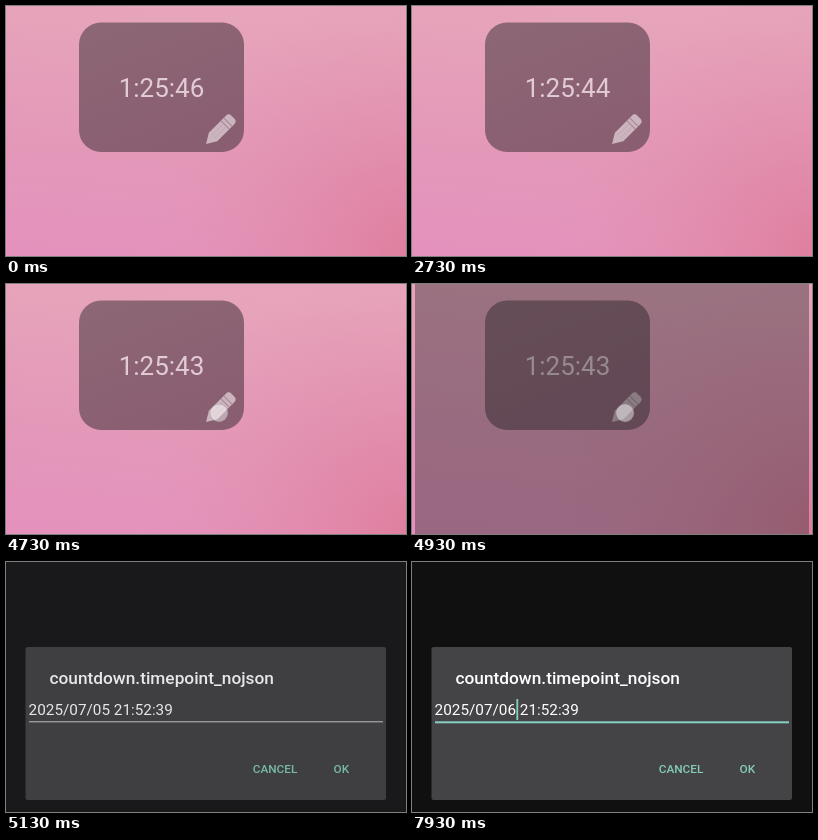
An HTML page for the animation above (8000 ms loop, 400 by 250 pixels).

```html
<!DOCTYPE html>
<html lang="en">
<head>
<meta charset="utf-8">
<title>Countdown widget</title>
<style>
  html, body { margin: 0; width: 100%; height: 100%; overflow: hidden; background: #e398b7; }
  svg { display: block; width: 100vw; height: 100vh; }
  text { font-family: Roboto, "Noto Sans", sans-serif; white-space: pre; }
  .medium { font-weight: 500; }
  .loop { animation: 8s linear infinite both; }

  #touch { animation-name: touch; }
  #screen { animation-name: screen; transform-origin: 200px 125px; }
  #dim { animation-name: dim; }
  #dialog { animation-name: dialog; }
  #idleLine { animation-name: idleLine; }
  #focusLine { animation-name: focusLine; }
  #caret { animation-name: caret; animation-timing-function: step-end; }
  #handle { animation-name: handle; }

  @keyframes touch {
    0%, 57.49% { opacity: 0; }
    57.5%, 61.9% { opacity: 1; }
    62.8%, 100% { opacity: 0; }
  }
  @keyframes screen {
    0%, 60% { opacity: 0; transform: scale(.97); }
    61.625% { opacity: .4; transform: scale(.985); }
    63.25%, 100% { opacity: 1; transform: none; }
  }
  @keyframes dim {
    0%, 62.5% { opacity: 0; }
    64.125% { opacity: .4; }
    66.6%, 100% { opacity: .6; }
  }
  @keyframes dialog {
    0%, 62.5% { opacity: 0; }
    64.125% { opacity: .9; }
    66.6%, 100% { opacity: 1; }
  }
  @keyframes idleLine {
    0%, 69.125% { opacity: 1; }
    71%, 100% { opacity: 0; }
  }
  @keyframes focusLine {
    0%, 69.125% { opacity: 0; }
    71%, 100% { opacity: 1; }
  }
  @keyframes caret {
    0% { opacity: 0; transform: none; }
    71.625% { opacity: 1; transform: none; }
    81.25% { opacity: 0; transform: none; }
    86.625% { opacity: 1; transform: translateX(-8.6px); }
    92.875% { opacity: 0; transform: translateX(-8.6px); }
    97.5%, 100% { opacity: 1; transform: none; }
  }
  @keyframes handle {
    0%, 71.62% { opacity: 0; }
    71.63%, 86.62% { opacity: 1; }
    86.63%, 100% { opacity: 0; }
  }
</style>
</head>
<body>
<svg viewBox="0 0 400 250" preserveAspectRatio="none">
  <defs>
    <linearGradient id="sky" x1=".35" y1="0" x2=".2" y2="1">
      <stop offset="0" stop-color="#e6a5ba"/>
      <stop offset=".6" stop-color="#e498b9"/>
      <stop offset="1" stop-color="#e492bd"/>
    </linearGradient>
    <radialGradient id="glow" gradientUnits="userSpaceOnUse" cx="400" cy="245" r="260">
      <stop offset="0" stop-color="#df7f9f"/>
      <stop offset="1" stop-color="#e291ae" stop-opacity="0"/>
    </radialGradient>
    <linearGradient id="card" x1="0" y1="0" x2=".5" y2="1">
      <stop offset="0" stop-color="#8d6775"/>
      <stop offset="1" stop-color="#895e71"/>
    </linearGradient>
  </defs>

  <rect width="400" height="250" fill="url(#sky)"/>
  <rect width="400" height="250" fill="url(#glow)"/>

  <rect x="73" y="16.5" width="165" height="129.5" rx="22" fill="url(#card)"/>
  <text id="countdown" x="155.5" y="91" font-size="26" text-anchor="middle" fill="#e2cbd5">1:25:46</text>
  <g transform="translate(200 138) rotate(-45)">
    <path d="M0 0 10-6H34Q38-6 38-2V2Q38 6 34 6H10Z" fill="#cbb4be"/>
    <path d="M27-6V6M31-6V6" stroke="#a68795" stroke-width="1"/>
    <path d="M10-2H26M10 2H26" stroke="#bda3af" stroke-width=".7"/>
  </g>

  <rect id="screen" class="loop" y="-20" width="400" height="290" fill="#2a282b"/>
  <rect id="dim" class="loop" width="400" height="250"/>
  <circle id="touch" class="loop" cx="213" cy="129" r="9" fill="#fff" fill-opacity=".45"
          stroke="#777" stroke-opacity=".3" stroke-width=".8"/>

  <g id="dialog" class="loop">
    <rect x="19.5" y="85" width="360.5" height="153" rx="2" fill="#444346"/>
    <text class="medium" x="43.4" y="121.5" font-size="17.3" fill="#fff">countdown.timepoint_nojson</text>
    <text id="date" x="22.6" y="153" font-size="15.3" fill="#fff">2025/07/05 21:52:39</text>
    <rect id="idleLine" class="loop" x="23" y="159.3" width="354" height="1" fill="#d0d0d0"/>
    <rect id="focusLine" class="loop" x="23" y="159.3" width="354" height="2" fill="#86cfc0"/>
    <rect id="caret" class="loop" x="104.4" y="137" width="1.8" height="21" fill="#86cfc0"/>
    <path id="handle" class="loop" d="M105.5 159.5 113 165.3A10 10 0 1 1 98 165.3Z" fill="#8bd2c4"/>
    <g class="medium" font-size="11.8" fill="#84cdb9">
      <text class="medium" x="246.7" y="211.3">CANCEL</text>
      <text class="medium" x="327.5" y="211.3">OK</text>
    </g>
  </g>
</svg>
<script>
  const countdown = document.getElementById("countdown");
  const date = document.getElementById("date");
  const clock = document.getAnimations()[0];
  const ticks = [800, 1730, 2730];

  function draw() {
    const t = (clock.currentTime || 0) % 8000;
    const elapsed = ticks.filter(tick => t >= tick).length;
    const digit = t < 6930 ? "5" : t < 7800 ? "" : "6";
    countdown.textContent = "1:25:" + (46 - elapsed);
    date.textContent = `2025/07/0${digit} 21:52:39`;
    requestAnimationFrame(draw);
  }
  draw();
</script>
</body>
</html>
```
